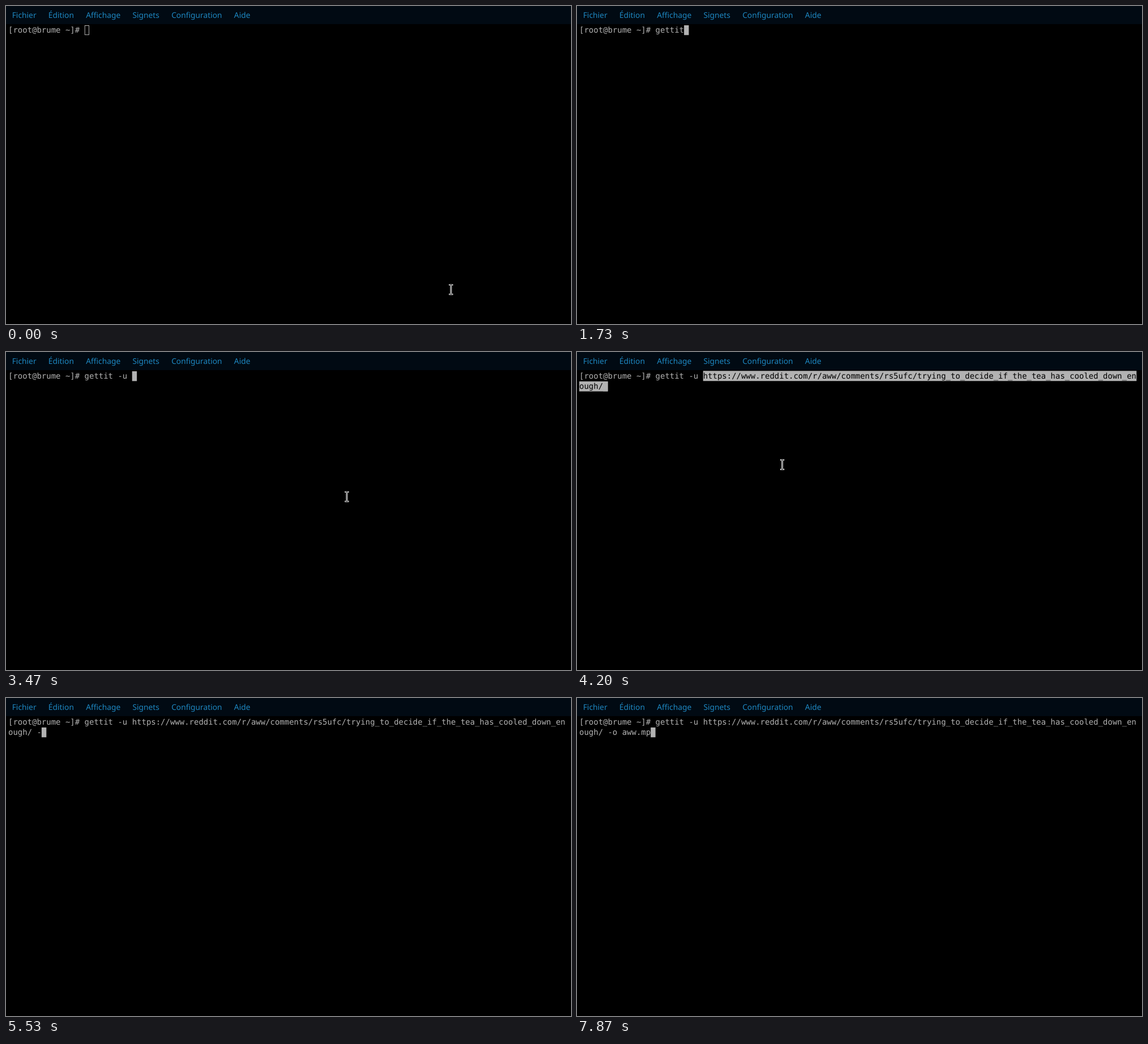
These frames come from a looping animation (998x561 px, 8000 ms). An HTML page:

```html
<!DOCTYPE html>
<html lang="fr">
<head>
<meta charset="utf-8">
<title>Terminal</title>
<style>
  html, body { margin: 0; width: 100%; height: 100%; overflow: hidden; background: #000; }
  svg { display: block; width: 998px; height: 561px; }
  text { white-space: pre; text-rendering: geometricPrecision; }
  #menu { font: 13.8px "Noto Sans", sans-serif; fill: #1e87c1; }
  #rows { font: 13.974px "DejaVu Sans Mono", monospace; fill: #b2b2b2; }
  .bar { fill: #b2b2b2; }
  .picked { fill: #000; }
</style>
</head>
<body>
<svg viewBox="0 0 998 561">
  <rect width="998" height="561"/>
  <rect width="998" height="32" fill="#010a13"/>
  <text id="menu" x="10.7" y="21"></text>
  <g id="marks" class="bar">
    <rect y="33.3" height="17.9"/>
    <rect y="51.8" height="17.7"/>
  </g>
  <rect id="caret"/>
  <g id="rows">
    <text x="4" y="47"><tspan></tspan><tspan></tspan></text>
    <text x="4" y="65"><tspan></tspan><tspan></tspan></text>
  </g>
  <g id="mouse" fill="none">
    <path d="M-3.6-8.2H3.6M-3.6 8.6H3.6" stroke="#fff" stroke-width="2.2"/>
    <path d="M0-8V8.4" stroke="#fff" stroke-width="2.8"/>
    <path d="M-2.6-8.2H2.6M0-8.2V8.6M-2.6 8.6H2.6" stroke="#000" stroke-width=".8"/>
  </g>
</svg>
<script>
const LOOP = 8000, FPS = 15, COLS = 117, CELL = 8.413, LEFT = 4;
const MENU = ['Fichier', 'Édition', 'Affichage', 'Signets', 'Configuration', 'Aide'], GAP = 21.2;
const PROMPT = '[root@brume ~]# ';
const URL_TEXT = 'https://www.reddit.com/r/aww/comments/rs5ufc/trying_to_decide_if_the_tea_has_cooled_down_enough/';

// All times below are ticks of 1/15 s.
const FOCUS = 9, HIDE = 18, SHOW = 43, PASTE = 57, SETTLE = 73;
const HEAD = 'gettit -u ', HEAD_AT = [18, 19, 21, 22, 24, 25, 27, 33, 39, 42];
const TAIL = ' -o aww.mp', TAIL_AT = [80, 83, 93, 95, 97, 101, 102, 107, 116, 118];

// Pointer strokes: start, end, from x, y, to x, y
const STROKES = [
  [0, 5, 786, 500, 554, 321],
  [43, 44, 566, 281, 562, 242],
  [46, 47, 562, 242, 571, 251],
  [50, 51, 571, 251, 565, 250],
  [51, 52, 565, 250, 602, 255],
  [56, 60, 602, 255, 362.5, 198.5]
];

const $ = id => document.getElementById(id);
const rows = [...$('rows').children], marks = [...$('marks').children];
const typed = (text, times, k) => text.slice(0, times.filter(at => at <= k).length);

function set(el, attrs) {
  for (const name in attrs) el.setAttribute(name, attrs[name]);
}

function drawLine(k) {
  const start = PROMPT + typed(HEAD, HEAD_AT, k);
  const line = start + (k >= PASTE ? URL_TEXT : '') + typed(TAIL, TAIL_AT, k);
  const picking = k >= PASTE && k < SETTLE;
  const from = picking ? start.length : line.length;
  rows.forEach((row, i) => {
    const a = i * COLS, b = a + COLS, cut = Math.max(a, Math.min(b, from));
    const [plain, picked] = row.children;
    plain.textContent = line.slice(a, cut);
    picked.textContent = line.slice(cut, b);
    const end = Math.min(b, line.length + 1);
    set(marks[i], {
      x: LEFT + (cut - a) * CELL,
      width: picking ? Math.max(0, end - cut) * CELL : 0
    });
  });
  const x = LEFT + line.length % COLS * CELL;
  const y = 34 + Math.floor(line.length / COLS) * 18;
  set($('caret'), k < FOCUS
    ? { x: x + 0.7, y: y + 0.5, width: CELL - 1.2, height: 16.2, fill: 'none', stroke: '#b2b2b2' }
    : { x, y, width: CELL, height: 17.3, fill: '#b2b2b2', stroke: 'none' });
}

function drawMouse(k) {
  const shown = k < HIDE || (k >= SHOW && k < SETTLE);
  const [t0, t1, x0, y0, x1, y1] = STROKES.filter(s => s[0] <= k).pop();
  const p = Math.min(1, (k - t0) / (t1 - t0)), e = p * p * (3 - 2 * p);
  set($('mouse'), {
    transform: `translate(${x0 + (x1 - x0) * e} ${y0 + (y1 - y0) * e})`,
    visibility: shown ? 'visible' : 'hidden'
  });
}

function frame() {
  const k = Math.floor((performance.now() % LOOP + 5) * FPS / 1000);
  drawLine(k);
  drawMouse(k);
  requestAnimationFrame(frame);
}

$('menu').innerHTML = MENU.map((item, i) => `<tspan dx="${i ? GAP : 0}">${item}</tspan>`).join('');
rows.forEach(row => set(row.children[1], { class: 'picked' }));
frame();
</script>
</body>
</html>
```
